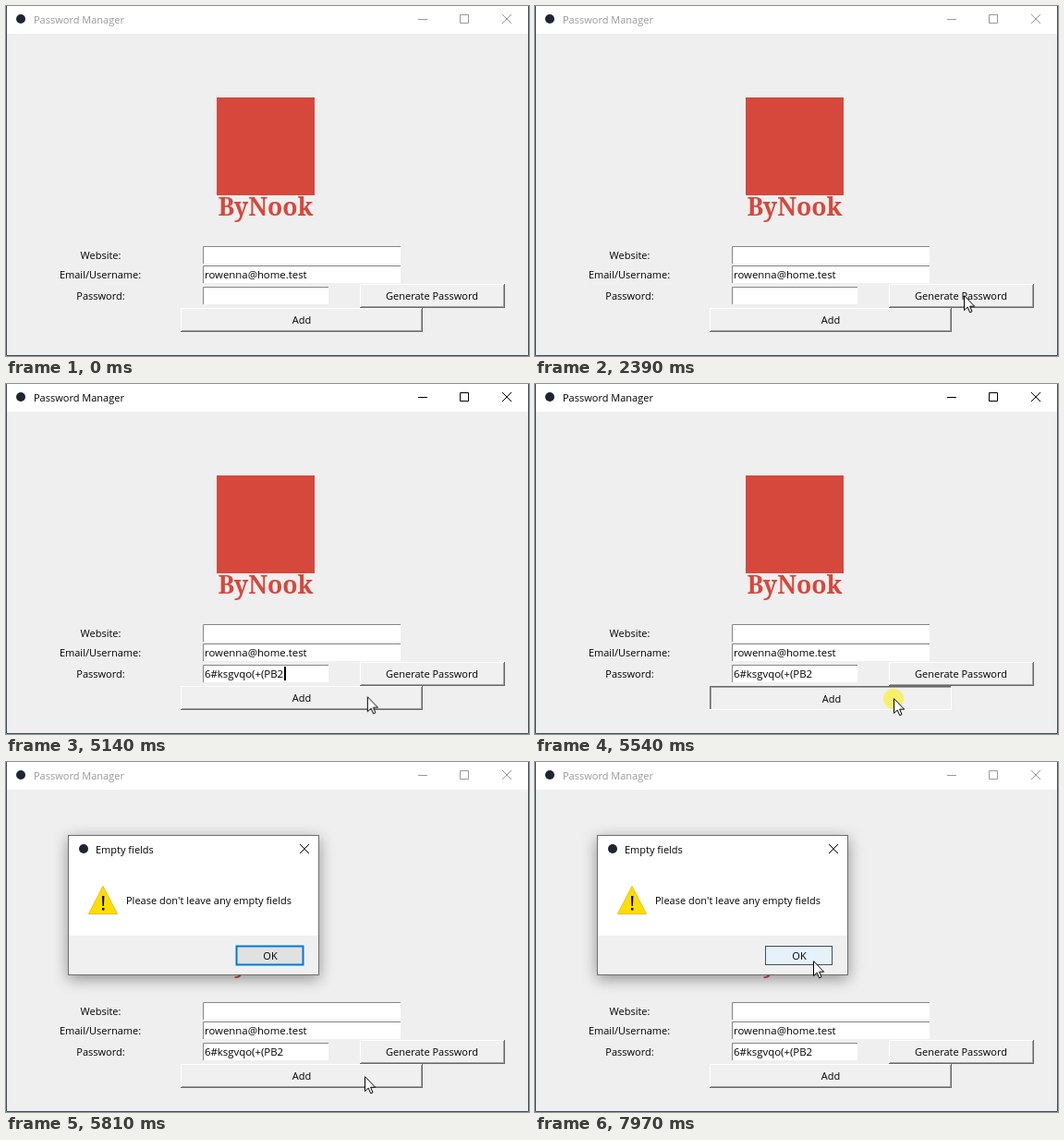
Write an HTML page that moves like this. It is 566 px wide and 379 px high and loops after 8000 ms.

```html
<!DOCTYPE html>
<html lang="en">
<head>
<meta charset="utf-8">
<title>Password Manager</title>
<style>
  html, body { margin: 0; width: 100%; height: 100%; overflow: hidden; background: #efefef; }
  svg { display: block; width: 566px; height: 379px; }
  text { font: 500 11px "Open Sans", "Noto Sans", sans-serif; fill: #000; }
  .mid { text-anchor: middle; }
  .entry { font-size: 11.4px; }
  .title { fill: currentColor; }
  .brand { font: bold 26.5px "Noto Serif", serif; fill: #d6483c; }
  .line { fill: none; stroke: currentColor; }
  .icon { fill: #1c2733; }

  .bar, .btn, .caret, .secret, .halo { animation: 8s step-end infinite; }
  .bar { animation-name: focus; }
  .caret1 { animation-name: caret1; }
  .caret2 { animation-name: caret2; }
  .secret { animation-name: secret; }
  .halo { animation-name: halo; }

  .btn { --lt: #fff; --dk: #696969; --shift: 0px; }
  .btn .lt { fill: var(--lt); }
  .btn .dk { fill: var(--dk); }
  .btn .face { fill: #f0f0f0; }
  .btn .face, .btn text { transform: translate(var(--shift), var(--shift)); }
  .generate { animation-name: press-generate; }
  .add { animation-name: press-add; }

  .dialog {
    color: #000; transform-origin: 203px 155px;
    filter: drop-shadow(0 4px 8px rgba(0, 0, 0, .4));
    animation: open 8s linear infinite;
  }
  .ok { animation: hover 8s linear infinite; }
  .pointer { animation: move 8s linear infinite; }

  @keyframes focus {
    0% { color: #999; } 45% { color: #000; } 70.125%, 100% { color: #999; }
  }
  @keyframes press-generate {
    0% { --lt: #fff; --dk: #696969; --shift: 0px; }
    45% { --lt: #696969; --dk: #fff; --shift: 1px; }
    47.625%, 100% { --lt: #fff; --dk: #696969; --shift: 0px; }
  }
  @keyframes press-add {
    0% { --lt: #fff; --dk: #696969; --shift: 0px; }
    67.625% { --lt: #696969; --dk: #fff; --shift: 1px; }
    70.125%, 100% { --lt: #fff; --dk: #696969; --shift: 0px; }
  }
  @keyframes halo {
    0% { opacity: 0; } 45% { opacity: .75; } 47.625% { opacity: 0; }
    67.625% { opacity: .75; } 70.125%, 100% { opacity: 0; }
  }
  @keyframes caret1 {
    0% { opacity: 0; } 45% { opacity: 1; } 47.625%, 100% { opacity: 0; }
  }
  @keyframes caret2 {
    0% { opacity: 0; } 47.625% { opacity: 1; } 52.625% { opacity: 0; }
    57.625% { opacity: 1; } 65.125%, 100% { opacity: 0; }
  }
  @keyframes secret {
    0% { opacity: 0; } 47.625%, 100% { opacity: 1; }
  }
  @keyframes open {
    0%, 70% { opacity: 0; transform: scale(.96); }
    70.875% { opacity: .6; transform: scale(.982); }
    72.6%, 100% { opacity: 1; transform: none; }
  }
  @keyframes hover {
    0%, 94.4% { fill: #e1e1e1; stroke: #0078d7; stroke-width: 2; }
    96%, 100% { fill: #e5f1fb; stroke: #3c5064; stroke-width: 1; }
  }
  @keyframes move {
    0%, 19.99% { opacity: 0; transform: translate(424px, 360px); }
    20%, 22.5% { opacity: 1; transform: translate(424px, 360px); animation-timing-function: ease-in-out; }
    29.8%, 60.125% { opacity: 1; transform: translate(464px, 313px); }
    64.2% { transform: translate(391px, 338px); }
    65.125%, 83.25% { transform: translate(388px, 340px); }
    85.75% { transform: translate(369px, 313px); }
    94.4%, 100% { opacity: 1; transform: translate(301px, 215px); }
  }
</style>
</head>
<body>
<svg viewBox="0 0 566 379">
  <rect width="566" height="379" fill="#efefef"/>

  <g class="bar">
    <rect width="566" height="30" fill="#fff"/>
    <circle class="icon" cx="16" cy="14" r="5"/>
    <text class="title" x="30" y="19">Password Manager</text>
    <path class="line" d="M446 14.5h10M491.5 9.5h9v9h-9z"/>
    <path class="line" d="M537 9l10 10M547 9l-10 10"/>
  </g>
  <path d="M.5 0V378.5H565.5V0" fill="none" stroke="#3b4f63"/>

  <rect x="228" y="99" width="106" height="106" fill="#d6483c"/>
  <text class="brand mid" x="281" y="227">ByNook</text>

  <text class="mid" x="102.5" y="274">Website:</text>
  <text class="mid" x="102" y="295">Email/Username:</text>
  <text class="mid" x="102.5" y="318">Password:</text>

  <path d="M213 260h214v19h-214zM213 281h214v19h-214zM213 304h136v19h-136z" fill="#fff"/>
  <path d="M213.5 279v-18.5h213.5M213.5 300v-18.5h213.5M213.5 323v-18.5h135.5" fill="none" stroke="#868686"/>
  <text class="entry" x="215" y="295">rowenna@home.test</text>
  <text class="entry secret" x="215" y="318">6#ksgvqo(+(PB2</text>
  <rect class="caret caret1" x="214" y="306" width="2" height="15"/>
  <rect class="caret caret2" x="301" y="306" width="2" height="15"/>

  <g class="btn generate">
    <rect class="dk" x="383" y="301" width="157" height="26"/>
    <rect class="lt" x="383" y="301" width="156" height="25"/>
    <rect x="384" y="302" width="155" height="24" fill="#a0a0a0"/>
    <rect class="face" x="384" y="302" width="154" height="23"/>
    <text class="mid" x="461" y="318">Generate Password</text>
  </g>
  <g class="btn add">
    <rect class="dk" x="189" y="327" width="262" height="26"/>
    <rect class="lt" x="189" y="327" width="261" height="25"/>
    <rect x="190" y="328" width="260" height="24" fill="#a0a0a0"/>
    <rect class="face" x="190" y="328" width="259" height="23"/>
    <text class="mid" x="320" y="344">Add</text>
  </g>

  <g class="dialog">
    <rect x="67.5" y="79.5" width="271" height="151" fill="#fff" stroke="#6e6e6e"/>
    <rect x="68" y="188" width="270" height="42" fill="#f0f0f0"/>
    <circle class="icon" cx="84" cy="94" r="5"/>
    <text class="title" x="97" y="99">Empty fields</text>
    <path class="line" d="M318 89l10 10M328 89l-10 10"/>
    <path d="M105 134.5L120.5 164.5H89.5z" fill="#ffde00" stroke="#eebb1c" stroke-linejoin="round"/>
    <path d="M104 145h2.4l-.5 11h-1.4zM104 158h2.4v2.5h-2.4z"/>
    <text x="130" y="154">Please don't leave any empty fields</text>
    <rect class="ok" x="249.5" y="199.5" width="72" height="20"/>
    <text class="mid" x="286" y="214">OK</text>
  </g>

  <g class="pointer">
    <circle class="halo" cy="1" r="11" fill="#f8f040"/>
    <path d="M.5 .7V16.6L4.2 13.1L6.7 18.8L9 17.8L6.6 12.2H11.6z" fill="#fff" stroke="#000"/>
  </g>
</svg>
</body>
</html>
```
